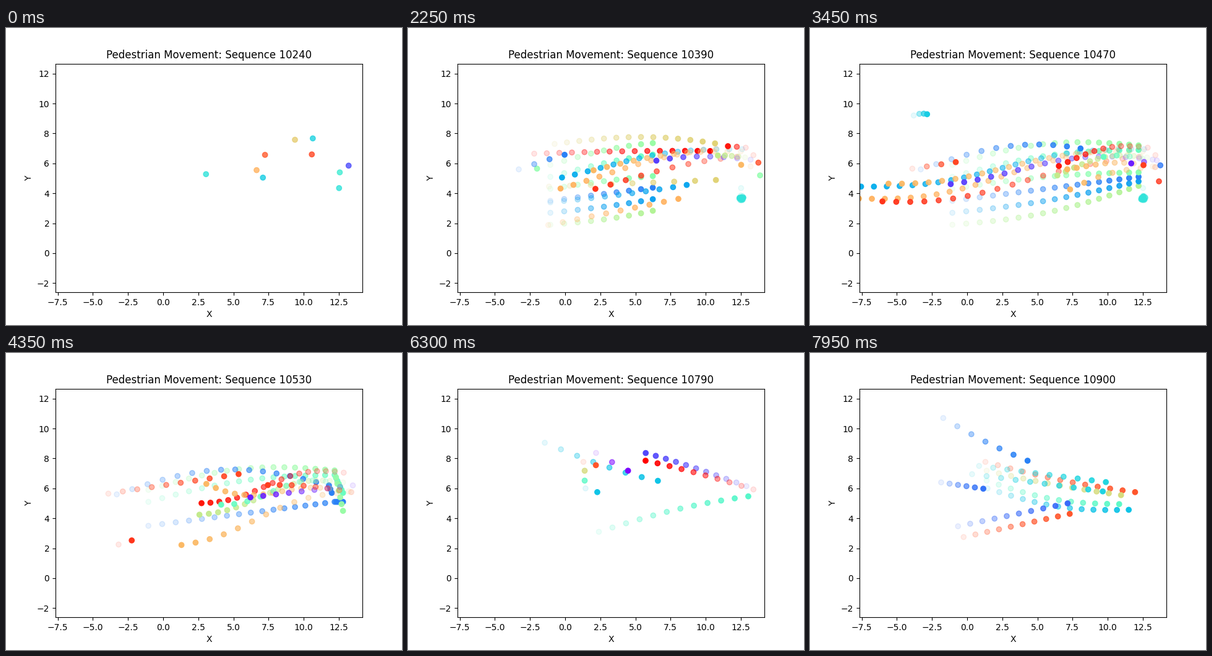
Recreate the animation shown at these times as a matplotlib script. Size 640 by 480 pixels, loop 8000 ms.

```python
import numpy as np
import matplotlib.pyplot as plt
from matplotlib.animation import FuncAnimation

STEP_TICKS = 3
TICK_MS = 50
TICKS = 160
GAP_STEP, GAP = 31, 130
CUT, END = GAP_STEP - 1, 53

walkers = []


def add(hue, birth, x, y):
    walkers.append((birth, np.column_stack([x, y]), plt.cm.rainbow(hue)[:3]))


def walk(hue, birth, last, start, end, bow=0, sway=0, ease=0, linger=0, drift=0):
    """Walk from start to end, bent by one arc (bow) and one S-curve (sway), then linger."""
    u = np.linspace(0, 1, last - birth + 1)
    u += ease * u * (1 - u)
    x = start[0] + (end[0] - start[0]) * u
    y = start[1] + (end[1] - start[1]) * u
    y += bow * np.sin(np.pi * u) + sway * np.sin(2 * np.pi * u)
    wait = np.arange(1, linger + 1)
    add(hue, birth, np.append(x, end[0] + .1 * wait), np.append(y, end[1] + drift * wait))


def walk_west(hue, birth, last, start, end, bow=0, ease=0):
    walk(hue, birth, last, start, end, bow, sway=.4, ease=ease)


def stand(hue, last, x, y, seed):
    """Settle onto (x, y) and shuffle on the spot."""
    steps = np.arange(last + 1)
    shuffle = np.random.default_rng(seed).normal(0, .07, (2, last + 1)) * (steps > 0)
    add(hue, 0, x + shuffle[0], y + .7 * np.exp(-steps) + shuffle[1])


# Present at the start
walk(.35, 0, 10, (3.05, 5.28), (13.5, 5.8))
walk(.75, 0, 9, (6.65, 5.55), (13.2, 5.3))
walk(.30, 0, 6, (7.1, 5.05), (13.2, 5.2))
walk(.88, 0, 6, (7.25, 6.57), (13.3, 6.4))
walk(.70, 0, 14, (9.38, 7.58), (-2.2, 4.6))
walk(.91, 0, 14, (10.58, 6.6), (-1.7, 4.3), -.2)
walk(.31, 0, 13, (10.65, 7.67), (-.2, 5.1), -.2)
stand(.35, 25, 12.52, 3.65, seed=4)

# Seen for a single step
for hue, birth, spot in [(.38, 0, (12.57, 5.4)), (.10, 0, (13.2, 5.85)), (.53, 15, (-2, 5.65)),
                         (.53, 15, (13.87, 5.2)), (.90, 15, (13.75, 6.05)),
                         (.16, 23, (13.75, 5.87)), (.93, 23, (13.65, 4.8))]:
    walk(hue, birth, birth, spot, spot)

# A crowd walks east in parallel lanes; some of it lingers on the right
for lane, hue in enumerate((.60, .22, .17, .52, .46, .55)):
    upper = lane >= 4
    stays = upper or lane == 2
    walk(hue, 7, 23, (-1.05, 1.9 + .8 * lane), (12.2, 4.5 + .3 * lane + 1.2 * upper),
         bow=.25 * lane - .5, ease=.2, linger=7 * stays, drift=-.05 * (lane - 2) ** 2)

# Others heading east
walk(1.0, 1, 18, (-2.2, 6.65), (13.0, 6.8), .1)
walk(.69, 2, 18, (-.75, 7.3), (13.3, 6.9), .65)
walk(.23, 5, 20, (-1.05, 3.4), (13.5, 5.4), -.2)
walk(.75, 6, 20, (-1.2, 1.88), (13.2, 4.6))
walk(.69, 7, 17, (-1.15, 4.45), (13.7, 5.0))
walk(.17, 12, 27, (-3.3, 5.6), (11.8, 6.2), 1.35, ease=.1, linger=3, drift=-.25)
walk(.30, 20, 24, (-3.8, 9.2), (-2.7, 9.25), .1, ease=.6)
walk(.91, 20, CUT, (-3.9, 5.65), (6.4, 7.1))
walk(.93, 28, CUT, (-3.17, 2.25), (-1.3, 2.8))

# Heading west
walk_west(.24, 1, 23, (12.6, 6.95), (-7.55, 4.45))
walk_west(.75, 2, 23, (11.65, 7.1), (-7.7, 3.65), -.4)
walk_west(.74, 4, 25, (12.5, 6.8), (-7.5, 4.7), -.1)
walk_west(.93, 5, 24, (13.4, 6.55), (-7.0, 3.5), -.45, ease=.1)
walk_west(.08, 8, 27, (13.2, 6.25), (-5.0, 4.4), .35)
walk_west(.63, 11, CUT, (12.8, 6.4), (1.9, 4.2), .3, ease=-.2)
walk_west(.97, 13, CUT, (12.85, 7.05), (2.1, 5.0), .2)
walk_west(.74, 14, CUT, (13.2, 5.8), (2.4, 6.6), -.5)
walk_west(.74, 17, CUT, (13.35, 5.75), (.3, 2.1), .1)
walk_west(.45, 20, CUT, (12.5, 6.3), (3.2, 4.95), .2)
walk(.04, 21, CUT, (13.5, 6.2), (5.3, 5.3))
walk(.92, 22, CUT, (13.4, 5.75), (6.6, 6.2), .2)

# After the gap
walk(.42, GAP_STEP, 43, (2.4, 3.1), (14.0, 5.6), .3)
walk(.20, GAP_STEP, 41, (-2.8, -.3), (7.5, 1.6))
walk(.09, 32, 50, (12.9, 6.15), (0, 9.6), .3)
walk(1.0, 33, 50, (13.4, 5.93), (-1.1, 8.9), .35)
walk(.28, 35, 48, (-1.45, 9.05), (13.5, 5.8), -.8)
walk(.01, 40, 48, (2.2, 8.37), (11.3, 5.6), -.7)
walk(.89, 41, END, (1.3, 7.77), (11.95, 5.75), -.2)
walk(.28, 41, END, (1.45, 6.0), (11.5, 4.57), -.5)
walk(.67, 42, END, (1.39, 7.18), (10.95, 5.55), -.1)
walk(.43, 42, END, (1.39, 6.52), (10.82, 4.95), -.45)
walk(.32, 44, END, (.85, 7.5), (9.87, 6.42))
walk(.31, 44, END, (.35, 6.95), (9.65, 5.8))
walk(.14, 44, END, (-.65, 3.47), (7.15, 5.0))
walk(.89, 44, END, (-.25, 2.75), (7.3, 4.3))
walk(.17, 47, END, (-1.7, 10.7), (4.3, 7.85), -.15)
walk(.15, 48, END, (-1.85, 6.4), (1.15, 5.98))


fig, ax = plt.subplots(figsize=(6.4, 4.8), dpi=100)
ax.set(xlim=(-7.66, 14.18), ylim=(-2.614, 12.664), xlabel="X", ylabel="Y")
title = ax.set_title("")
dots = ax.scatter([], [])


def update(tick):
    step = tick // STEP_TICKS
    places, colors = [], []
    for birth, path, color in walkers:
        count = step - birth + 1
        if 0 < count <= len(path):
            fade = np.linspace(.1, 1, count) if count > 1 else [.8]
            places.extend(path[:count])
            colors.extend((*color, alpha) for alpha in fade)
    dots.set_offsets(np.array(places))
    dots.set_facecolor(colors)
    sequence = 10240 + 10 * step + (GAP if step >= GAP_STEP else 0)
    title.set_text(f"Pedestrian Movement: Sequence {sequence}")
    return dots, title


anim = FuncAnimation(fig, update, frames=TICKS, interval=TICK_MS, repeat=True, repeat_delay=0)
plt.show()
```
